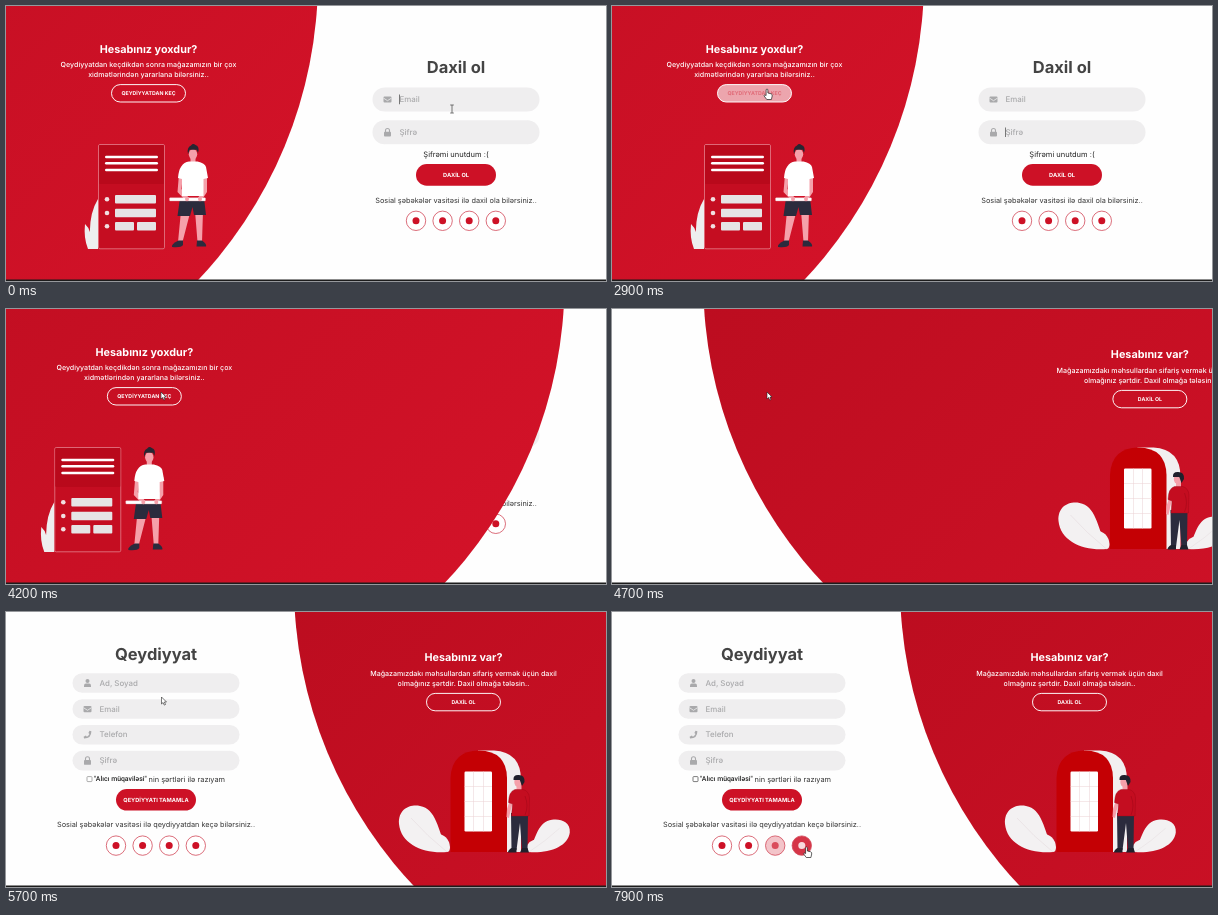
An HTML page with a canvas for the animation above (8 s loop, 600x275 px).

```html
<!DOCTYPE html>
<html lang="az">
<head>
<meta charset="utf-8">
<title>Daxil ol</title>
<style>
html, body { margin: 0; width: 100%; height: 100%; overflow: hidden; background: #fff; }
canvas { display: block; width: 600px; height: 275px; }
</style>
</head>
<body>
<canvas id="stage"></canvas>
<script>
const W = 600, H = 275, LOOP = 8000, STEP = 100;
const canvas = document.getElementById('stage');
const ctx = canvas.getContext('2d');
const RED = '#cd1126', NAVY = '#2b2b3d', SKIN = '#f5a0aa', GREY = '#a9a9ab';
const R = 439.2, SHIFT = 351.4;

const clamp = v => Math.max(0, Math.min(1, v));

// cubic-bezier(.42, 0, .58, 1)
function ease(x) {
  x = clamp(x);
  let lo = 0, hi = 1;
  for (let i = 0; i < 24; i++) {
    const s = (lo + hi) / 2, r = 1 - s;
    if (1.26 * s * r * r + 1.74 * s * s * r + s * s * s < x) lo = s; else hi = s;
  }
  return lo * lo * (3 - 2 * lo);
}

function along(keys, t) {
  let i = 0;
  while (i < keys.length - 2 && t >= keys[i + 1][0]) i++;
  const a = keys[i], b = keys[i + 1], k = clamp((t - a[0]) / (b[0] - a[0]));
  return a.slice(1).map((v, j) => v + (b[j + 1] - v) * k);
}

function fade(t, from, to) {
  const level = u => clamp((u - from) / 400);
  return t < to ? level(t) : Math.max(0, level(to) - (t - to) / 400);
}

function mix(a, b, k) {
  return `rgb(${a.map((v, i) => Math.round(v + (b[i] - v) * k)).join()})`;
}

function text(s, x, y, size, weight, color, align = 'center', font = 'Inter') {
  ctx.font = `${weight} ${size}px ${font}, sans-serif`;
  ctx.textAlign = align;
  ctx.fillStyle = color;
  ctx.fillText(s, x, y + size * 0.34);
}

function paint(fill, stroke, width = 1) {
  if (fill) { ctx.fillStyle = fill; ctx.fill(); }
  if (stroke) { ctx.strokeStyle = stroke; ctx.lineWidth = width; ctx.stroke(); }
}

function box(x, y, w, h, r, fill, stroke, width) {
  ctx.beginPath();
  ctx.roundRect(x, y, w, h, r);
  paint(fill, stroke, width);
}

function oval(x, y, rx, ry, fill, stroke, width) {
  ctx.beginPath();
  ctx.ellipse(x, y, rx, ry, 0, 0, 7);
  paint(fill, stroke, width);
}

function shape(d, fill, stroke, width = 1) {
  const p = new Path2D(d);
  if (fill) { ctx.fillStyle = fill; ctx.fill(p); }
  if (stroke) { ctx.strokeStyle = stroke; ctx.lineWidth = width; ctx.stroke(p); }
}

function at(x, y, draw, sx = 1, sy = 1) {
  ctx.save();
  ctx.translate(x, y);
  ctx.scale(sx, sy);
  draw();
  ctx.restore();
}

const icons = {
  mail() {
    box(-4, -3, 8, 6.2, 1, GREY);
    shape('M-4 -1.3 L0 1.3 L4 -1.3', null, '#efefef', 0.8);
  },
  lock() {
    box(-3.5, -0.6, 7, 4.8, 0.9, GREY);
    shape('M-2 0 V-1.8 A2 2 0 0 1 2 -1.8 V0', null, GREY, 1.1);
  },
  user() {
    oval(0, -2, 2, 2, GREY);
    shape('M-3.5 4 V2.6 Q-3.5 .6 -1.5 .6 H1.5 Q3.5 .6 3.5 2.6 V4 Z', GREY);
  },
  phone() {
    shape('M3.9 -3.4 L2 -3.9 L.9 -1.6 L2 -.6 Q1.2 1.2 -.6 2 L-1.6 .9 L-3.9 2 L-3.4 3.9 Q3.9 3.9 3.9 -3.4 Z', GREY);
  }
};

// x is measured from the middle of the form
function field(y, h, icon, label, caret) {
  box(-83.5, y - h / 2, 167, h, h / 2, '#efeeef');
  at(-68.5, y, icons[icon]);
  text(label, -56.5, y, 7.9, 500, GREY, 'left');
  if (caret) box(-56.9, y - 4.8, 0.7, 9.6, 0, '#444');
}

function socials(y, levels) {
  levels.forEach((k, i) => {
    const x = -40 + i * 26.6;
    oval(x, y, 9.7, 9.7, mix([255, 255, 255], [205, 17, 38], k), '#d2495a', 0.8);
    oval(x, y, 3.5, 3.5, mix([205, 17, 38], [255, 255, 255], k));
  });
}

function mainButton(y, label) {
  box(-40, y - 10.8, 80, 21.6, 10.8, RED);
  text(label, 0, y, 5.65, 700, '#fff');
}

function signIn(t) {
  const blink = t % 1000 < 500;
  text('Daxil ol', 0, 61, 16.5, 700, '#444');
  field(93.4, 24, 'mail', 'Email', t < 500);
  field(126.3, 24, 'lock', 'Şifrə', t >= 500 && t < 3500 && !blink);
  text('Şifrəmi unutdum :(', 0, 148.3, 7.5, 400, '#222');
  mainButton(168.9, 'DAXİL OL');
  text('Sosial şəbəkələr vasitəsi ilə daxil ola bilərsiniz..', 0, 194.5, 7.3, 400, '#333');
  socials(214.8, [0, fade(t, 1000, 1420), fade(t, 1480, 1700), fade(t, 1700, 2000)]);
}

function signUp(t) {
  text('Qeydiyyat', 0, 42, 16.5, 700, '#444');
  field(71, 19.6, 'user', 'Ad, Soyad');
  field(97, 19.6, 'mail', 'Email');
  field(122.7, 19.6, 'phone', 'Telefon');
  field(148.6, 19.6, 'lock', 'Şifrə');
  box(-69, 164.6, 5, 5, 0.8, '#fff', t > 6500 ? '#444' : '#888', 0.7);
  text('"Alıcı müqaviləsi"', -62, 167, 6.9, 500, '#222', 'left', 'Roboto');
  text('nin şərtləri ilə razıyam', 69, 167.2, 7.4, 400, '#333', 'right');
  mainButton(187.8, 'QEYDİYYATI TAMAMLA');
  text('Sosial şəbəkələr vasitəsi ilə qeydiyyatdan keçə bilərsiniz..', 0, 213, 7.3, 400, '#333');
  socials(233.6, [fade(t, 7000, 7200), fade(t, 7200, 7400), fade(t, 7180, 7600), fade(t, 7560, LOOP)]);
}

function disc(p) {
  const x = 312 - R + p * 854.4, y = -27.5, d = R * 0.707;
  const g = ctx.createLinearGradient(x + d, y + d, x - d, y - d);
  g.addColorStop(0, '#d21228');
  g.addColorStop(1, '#b80c1e');
  oval(x, y, R, R, g);
}

function panelText(y, title, lines, label, hover) {
  text(title, 0, y, 10.8, 700, '#fff');
  lines.forEach((s, i) => text(s, 0, y + 15.6 + i * 10.4, 7.08, 500, '#fff'));
  box(-37, y + 35.6, 74, 17.4, 8.7, `rgba(255,255,255,${hover})`, '#fff', 0.95);
  text(label, 0, y + 44.3, 5.25, 700, mix([255, 255, 255], [205, 17, 38], hover));
}

function boardScene() {
  shape('M92 193 V243 H82 Q77.5 232 79 218 Q82.5 221 83.8 226 Q84 206 92 193 Z', '#eeeeef');
  box(92.5, 138.5, 66, 104.3, 1.5, '#c50d21', '#e9909b', 0.7);
  box(93, 139, 65, 39, 1, '#b9091b');
  for (const y of [151, 157.3, 164]) box(99, y - 1.2, 53, 2.4, 1.2, '#fff');
  for (const y of [193.3, 207, 220.3]) oval(101, y, 2.3, 2.3, '#f1dfe1');
  box(109, 189, 41, 8.5, 1, '#e6e4e5');
  box(109, 202.8, 41, 8.5, 1, '#e6e4e5');
  box(109, 216, 19, 8.5, 1, '#e6e4e5');
  box(131, 216, 19, 8.5, 1, '#e6e4e5');

  shape('M175 205 L172 236 H176.5 L184 207 Z M189 205 L191.5 236 H196 L197 205 Z', SKIN);
  shape('M172.5 234.5 H177 V239 Q175 242 166 241 Q165 238 172.5 234.5 Z', NAVY);
  shape('M191 234.5 H196 Q201 238 200 240.5 H190.5 Z', NAVY);
  shape('M174 192 H198 L200 209 H188 L186.5 201 L184 210 H171.5 Z', NAVY);
  shape('M173 168 L177 168 L175.5 183 L183 192 L180 195 L171.5 186 Z', SKIN);
  shape('M197 168 L201 168 L201 186 L195 195 L192 192 L197 183 Z', SKIN);
  box(184.5, 150, 5, 9, 1, SKIN);
  shape('M183 155.5 H191.5 Q199 157 200 161 L202 172 L197.5 173 V190 H176 V173 L172 172 Q173 157 183 155.5 Z', '#fff');
  oval(187, 148.3, 4.2, 5.4, SKIN);
  shape('M182 148 Q180.5 141.5 185 139.5 Q187 137 189.5 139 Q194 140.5 192 147 L190.8 143.7 H183.5 Z', '#262632');
  box(163.5, 191.7, 36, 3.2, 0.7, '#fff', '#e0a8ae', 0.4);
  oval(181, 193, 2, 2.2, SKIN);
  oval(194, 193, 2, 2.2, SKIN);
}

// two leaves growing left from a shared foot at the origin
function bush() {
  shape('M0 0 C-24 2 -46 -8 -48 -28 C-49 -43 -37 -48 -27 -46 C-11 -43 -9 -24 0 0 Z', '#f3f1f2');
  shape('M0 0 Q-14 -4 -11 -19 Q2 -17 3 -5 Q3 0 0 0 Z', '#f3f1f2');
  shape('M-36 -34 Q-20 -16 0 0', null, '#e4dadd', 0.6);
}

function doorScene() {
  at(441, 240, bush);
  at(523, 240, bush, -0.85, 0.7);

  shape('M472 240 V138.5 H488 Q515 140 515 168 V240 Z', '#f2eff0');
  shape('M444.5 240 V166 Q446 138.5 473 138.5 Q500.5 139 501 166 V240 Z', '#c40004');
  box(458.5, 159.5, 27.5, 60, 1.2, '#fff');
  for (const x of [467.5, 477]) box(x, 159.5, 0.5, 60, 0, '#ead0d3');
  for (const y of [174.5, 189.5, 204.5]) box(458.5, y, 27.5, 0.5, 0, '#ead0d3');

  shape('M505 201 H522 L521.5 238 H516 L514 211 L510.5 238 H505.5 Z', NAVY);
  shape('M505.5 236 H510.5 V240.5 H502 Q502 238 505.5 236 Z M516 236 H521.5 L523 240.5 H514 Z', '#20202c');
  shape('M504 188 L507 189 L504.5 199 L503 206 L500.5 205 L501 197 Z', SKIN);
  box(510.5, 172, 5, 8, 1, SKIN);
  shape('M509 177.5 H517 Q523 179 523.5 186 L523 204 H505.5 L506.5 192 L502.5 190.5 Q503 179 509 177.5 Z', '#c40d20', '#9c0716', 0.4);
  shape('M519 184 Q523 194 519 203', null, '#9c0716', 0.5);
  oval(512, 170, 3.7, 4.8, SKIN);
  shape('M507.5 168 Q507 163 512 163 Q519 162.5 518.5 170 L516 174 L513.8 168 Z', '#20202c');
}

const elapsed = [[3500, 0], [3800, 300], [4200, 670], [4700, 1202], [5300, 1800]];
const path = [
  [0, 446, 103], [150, 446, 103], [450, 444, 126], [750, 442, 128], [1000, 437, 208],
  [1400, 437, 216], [1600, 470.5, 217], [1750, 490, 215], [1950, 494, 213], [2650, 160, 90],
  [2900, 155, 83], [5600, 155, 83], [5700, 155.5, 85], [6000, 150, 98], [6400, 118, 166],
  [6800, 140, 188], [7050, 112, 230], [7250, 137, 232], [7500, 163, 233], [7700, 190, 234],
  [7900, 194.5, 235]
];

function pointer(t) {
  const [x, y] = along(path, t);
  const within = list => list.some(([a, b]) => t >= a && t < b);
  at(x, y, () => {
    if (within([[0, 800], [5800, 6200]])) {
      shape('M-1.8 -4 H1.8 M0 -4 V4 M-1.8 4 H1.8', null, '#555', 0.8);
    } else if (within([[1000, 2000], [2650, 3500], [6300, LOOP]])) {
      shape('M-.9 .6 Q0 -.6 .9 .6 V4 L4.2 4.8 Q5.4 5.2 5.2 7 L4.4 10.5 H-.2 L-3 6.8 Q-2.7 5.2 -.9 6.5 Z', '#fff', '#222', 0.7);
    } else {
      shape('M0 0 V7 L1.6 5.5 L2.8 8.1 L4 7.5 L2.9 5 H5 Z', '#fff', '#222', 0.6);
    }
  });
}

function draw(t) {
  const e = along(elapsed, t)[0];
  const content = ease((e - 600) / 900) * SHIFT;
  const image = ease((e - 400) / 1100) * SHIFT;

  ctx.fillStyle = '#fefefe';
  ctx.fillRect(0, 0, W, H);
  at(450 - 300 * ease((e - 700) / 1000), 0, () => e < 800 ? signIn(t) : signUp(t));
  disc(ease(e / 1800));

  at(142.5 - content, 0, () => panelText(43, 'Hesabınız yoxdur?', [
    'Qeydiyyatdan keçdikdən sonra mağazamızın bir çox',
    'xidmətlərindən yararlana bilərsiniz..'
  ], 'QEYDİYYATDAN KEÇ', fade(t, 2650, 3465)));
  at(-image, 0, boardScene);
  at(457.5 + SHIFT - content, 0, () => panelText(45.8, 'Hesabınız var?', [
    'Mağazamızdakı məhsullardan sifariş vermək üçün daxil',
    'olmağınız şərtdir. Daxil olmağa tələsin..'
  ], 'DAXİL OL', 0));
  at(SHIFT - image, 0, doorScene);

  box(0, 273.5, W, 1.5, 0, '#1c1c1c');
  pointer(t);
}

const ratio = window.devicePixelRatio || 1;
canvas.width = W * ratio;
canvas.height = H * ratio;
ctx.scale(ratio, ratio);
ctx.textRendering = 'geometricPrecision';

function tick() {
  const t = performance.now() % LOOP;
  draw(Math.floor(t / STEP) * STEP);
  requestAnimationFrame(tick);
}
tick();
</script>
</body>
</html>
```
